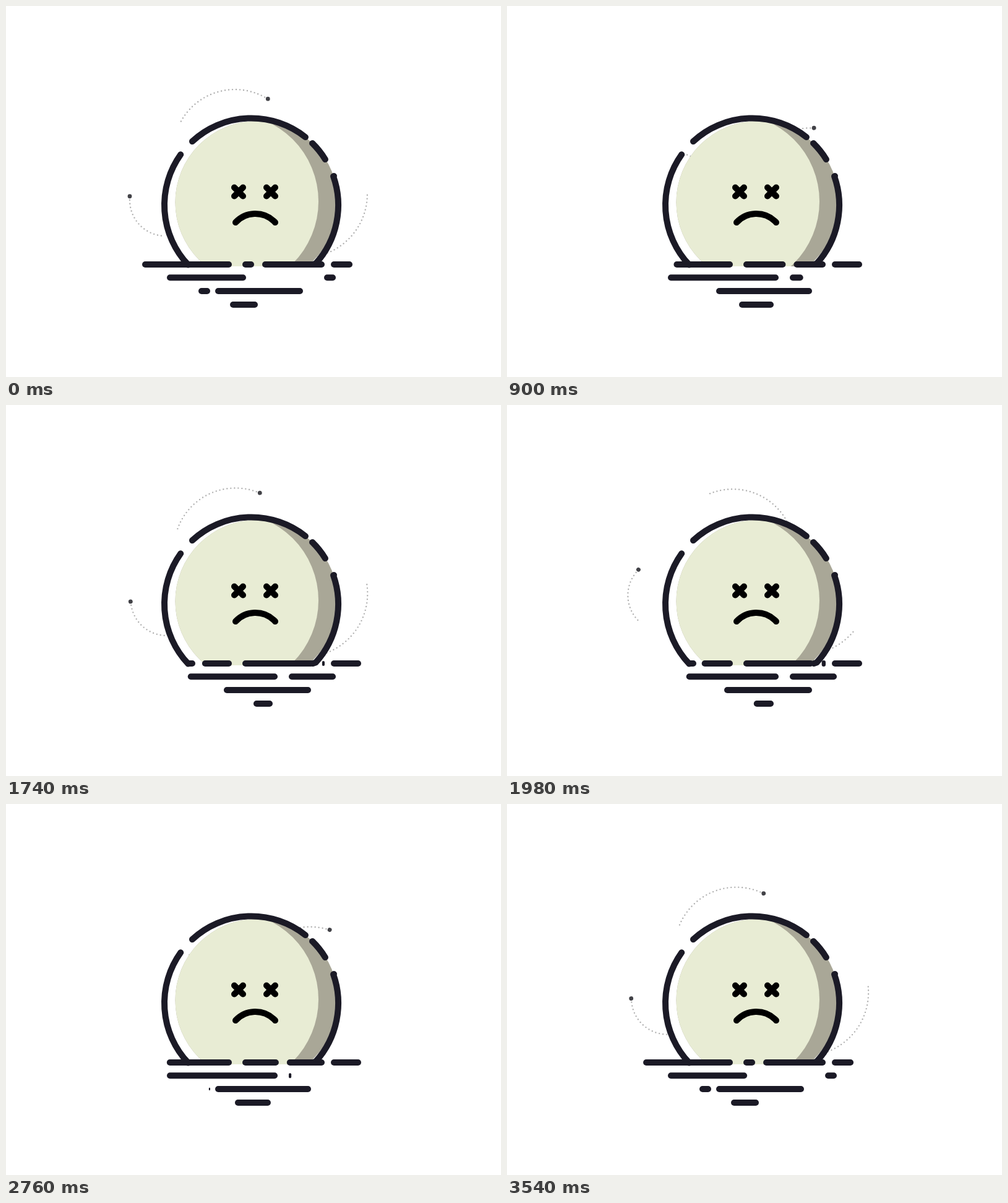
An HTML page with a canvas that plays this animation: 800x600 px, repeating every 3.57 s.

```html
<!DOCTYPE html>
<html lang="en">
<head>
<meta charset="utf-8">
<title>Sad moon</title>
<style>
  html, body { margin: 0; overflow: hidden; background: #fff; }
  canvas { display: block; }
</style>
</head>
<body>
<canvas id="stage" width="800" height="600"></canvas>
<script>
const ctx = document.getElementById('stage').getContext('2d');
const LOOP = 3570, HALF = LOOP / 2, TAU = Math.PI * 2;
const INK = '#1b1a26';

// Each dotted arc (centre c, radius r) turns around a slightly shifted pivot.
const orbits = [
  { pivot: [366, 228], c: [370, 234.5], r: 99.5, head: [423, 150], tail: [282, 188] },
  { pivot: [486, 302], c: [481.3, 304.2], r: 102.6, head: [479, 407], tail: [584, 303] },
  { pivot: [264.3, 304.4], c: [258, 314], r: 58, head: [200, 308], tail: [257, 372] }
];

const angle = ([cx, cy], [x, y]) => Math.atan2(y - cy, x - cx);
const easeInOut = p => p < .5 ? 2 * p * p : 1 - 2 * (1 - p) ** 2;

function disc(x, y, r, color) {
  ctx.fillStyle = color;
  ctx.beginPath();
  ctx.arc(x, y, r, 0, TAU);
  ctx.fill();
}

function drawOrbit({ pivot: [px, py], c, r, head, tail }, turn) {
  ctx.save();
  ctx.translate(px, py);
  ctx.rotate(turn);
  ctx.translate(-px, -py);
  ctx.strokeStyle = '#b0b0b0';
  ctx.lineWidth = 2.4;
  ctx.setLineDash([0, 6]);
  ctx.beginPath();
  ctx.arc(...c, r, angle(c, head), angle(c, tail), true);
  ctx.stroke();
  disc(...head, 3.4, '#424247');
  ctx.restore();
}

function drawMoon() {
  ctx.save();
  ctx.beginPath();
  ctx.rect(0, 0, 800, 421);
  ctx.clip();
  disc(405, 317.5, 131.5, '#a9a797');
  ctx.beginPath();
  ctx.arc(405, 317.5, 131.5, 0, TAU);
  ctx.clip();
  disc(363, 316, 142, '#e8ecd4');
  ctx.restore();
}

function drawOutline() {
  const c = [396.5, 322], r = 140.5;
  const arc = (from, to) => ctx.arc(...c, r, angle(c, from), angle(c, to));
  ctx.strokeStyle = INK;
  ctx.lineWidth = 10;
  ctx.beginPath();
  ctx.moveTo(301, 418);
  ctx.lineTo(295, 418);
  arc([295, 418], [282, 240]);
  ctx.moveTo(301, 219);
  arc([301, 219], [484, 212]);
  ctx.moveTo(495, 222);
  arc([495, 222], [516, 248]);
  ctx.moveTo(530, 275);
  arc([530, 275], [502, 418]);
  ctx.lineTo(496, 418);
  ctx.stroke();
}

function drawFace() {
  ctx.strokeStyle = '#000';
  ctx.lineWidth = 10;
  ctx.beginPath();
  for (const x of [376, 428]) {
    for (const d of [7, -7]) {
      ctx.moveTo(x - d, 293.5);
      ctx.lineTo(x + d, 307.5);
    }
  }
  ctx.moveTo(371, 350);
  ctx.arc(403, 379.6, 43.6, angle([403, 379.6], [371, 350]), angle([403, 379.6], [435, 350]));
  ctx.stroke();
}

// Rounded bar; it flattens into a sliver as it runs out.
function bar(y, left, right) {
  const w = right - left;
  if (w <= 0) return;
  const h = Math.min(10, w * 2);
  ctx.fillStyle = INK;
  ctx.beginPath();
  ctx.roundRect(left, y - h / 2, w, h, Math.min(w, h) / 2);
  ctx.fill();
}

function drawWater(e) {
  const s = 97 * e, u = 178 * e, q = 41 * e, p = 51 * e;
  bar(418, 220 + s, 365);
  bar(418, 382, 401 + s);
  bar(418, 414 + s, 515);
  bar(418, 525, Math.min(574, 560 + s));

  bar(439.3, Math.max(260, 116 + u), Math.min(439, 388 + u));
  bar(439.3, 457, Math.min(533, 388 + u));
  bar(439.3, 514 + u, 533);

  bar(461, 311 + q, 330);
  bar(461, Math.max(338, 311 + q), Math.min(493, 480 + q));

  bar(483, Math.max(362, 349 + p), Math.min(431, 407 + p));
}

function draw(now) {
  const t = now % LOOP;
  ctx.fillStyle = '#fff';
  ctx.fillRect(0, 0, 800, 600);
  ctx.lineCap = ctx.lineJoin = 'round';
  for (const orbit of orbits) drawOrbit(orbit, TAU * t / HALF);
  drawMoon();
  drawOutline();
  drawFace();
  drawWater(easeInOut(1 - Math.abs(t / HALF - 1)));
}

const start = performance.now();
function tick() {
  draw(performance.now() - start);
  requestAnimationFrame(tick);
}
tick();
</script>
</body>
</html>
```
